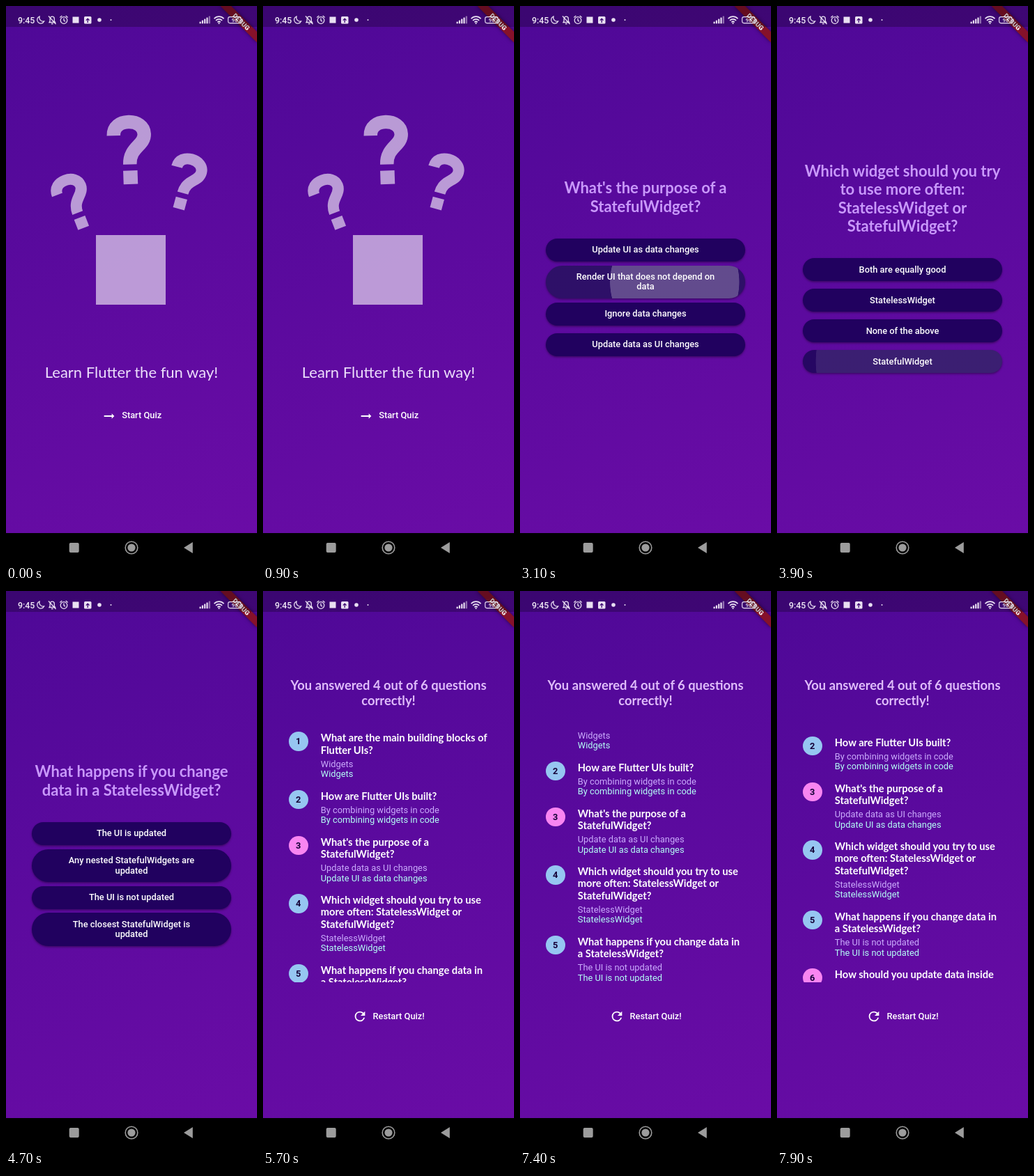
These frames come from a looping animation (360x800 px, 8000 ms). An HTML page:

```html
<!DOCTYPE html>
<html lang="en">
<head>
<meta charset="utf-8">
<title>Quiz</title>
<style>
html, body { margin: 0; width: 100%; height: 100%; overflow: hidden; background: #000; }
#stage { position: relative; width: 360px; height: 800px; overflow: hidden; background: #000;
  font: 500 12.83px/14.7px Roboto, sans-serif; color: #fff; }
#app { position: absolute; inset: 0 0 43.33px; background: linear-gradient(154.6deg, #4e0897, #6a0ca6); }
.screen { position: absolute; inset: 0 37px; display: flex; flex-direction: column; justify-content: center; }
.screen[hidden] { display: none; }
.title, .ask, .score, .q { font-family: Lato, sans-serif; white-space: pre; }
.title, .ask, .score { display: flex; justify-content: center; text-align: center; }
.title { position: absolute; top: 513px; left: 0; right: 0; font-size: 22px; line-height: 26.4px; font-weight: 400; color: #eddffc; }
.ask { font-weight: 700; font-size: 22px; line-height: 26.4px; color: #c999fb; margin-bottom: 27.5px; }
.slot { min-height: 44px; display: flex; align-items: center; }
.btn { width: 100%; box-sizing: border-box; padding: 9.16px 36.6px; border-radius: 24px; text-align: center;
  background-color: #21015f; box-shadow: 0 1.5px 3px rgba(0,0,0,.38); }
.link { height: 44px; display: flex; align-items: center; justify-content: center; gap: 7.3px; }
.link svg { width: 22px; height: 22px; fill: #fff; }
#start .link { position: absolute; top: 566.5px; left: 0; right: 0; }
.score { font-weight: 700; font-size: 18.33px; line-height: 22px; color: #e0bdfb; }
.list { height: 366.4px; margin: 27.5px 0; overflow: hidden; }
.item { display: flex; gap: 18.3px; padding: 7.33px 0; }
.badge { flex: none; width: 27.5px; height: 27.5px; border-radius: 50%; background: #96c6f1; color: #160238;
  font-weight: 700; line-height: 27.5px; text-align: center; }
.badge.bad { background: #f985f1; }
.q { font-weight: 700; font-size: 14.66px; line-height: 17.33px; margin-bottom: 4.58px; }
.a { font-weight: 400; white-space: pre; color: #caabfc; }
.a + .a { color: #b5fef6; }
#bar { position: absolute; inset: 0 0 auto; height: 30.33px; background: rgba(0,0,0,.25); }
#over { position: absolute; inset: 0; }
#banner { position: absolute; left: 301.4px; top: 16.6px; width: 73.3px; height: 11px; transform: rotate(45deg);
  background: #86112a; box-shadow: 0 0 5px rgba(0,0,0,.5); color: #fff; text-align: center;
  font: 900 9.35px/11px Roboto, sans-serif; }
</style>
</head>
<body>
<div id="stage">
  <div id="app">
    <div class="screen" id="start">
      <svg style="position:absolute;left:-37px;top:0" width="360" height="500" opacity=".59">
        <defs>
          <g id="mark">
            <path d="M-22-21C-22-34-12-40-0-40S22-33 22-22C22-5 0-4 0 21" fill="none" stroke="#fff" stroke-width="19.5"/>
            <rect x="-10" y="30" width="20.500" height="19.500" fill="#fff"/>
          </g>
        </defs>
        <g id="marks"></g>
        <rect x="129" y="329" width="100" height="100" fill="#fff"/>
      </svg>
      <div class="title">Learn Flutter the fun way!</div>
      <div class="link"><svg viewBox="0 0 24 24"><path d="M16 11H4v2h12v3l4-4-4-4z"/></svg>Start Quiz</div>
    </div>
  </div>
  <div id="banner">DEBUG</div>
  <div id="bar"></div>
  <svg id="over" width="360" height="800" fill="none" stroke="#e9e0f2" stroke-width="1.3">
    <text x="17" y="24.6" fill="#f0eaf6" stroke="none" font-size="12.4">9:45</text>
    <path d="M48 15a5.2 5.2 0 1 0 6.6 7A5.6 5.6 0 0 1 48 15z"/>
    <path d="M62 23.5h8.6l-1.3-2v-3.2a3.1 3.1 0 0 0-6.2 0v3.2zM65 25.6h2.6M61 14.5l10.5 11.5"/>
    <circle cx="83" cy="20.5" r="4.8"/><path d="M83 17.5v3.3l2 1.3M77.3 16.5l3-2.5M88.7 16.5l-3-2.5"/>
    <g fill="#e9e0f2" stroke="none">
      <rect x="95.5" y="15.5" width="9" height="9"/>
      <rect x="112" y="15" width="10.5" height="10.5" rx="1.5"/>
      <circle cx="134" cy="20" r="2.8"/><circle cx="150.5" cy="20" r="1"/>
    </g>
    <path d="M117.2 24v-5.5M114.8 20.6l2.4-2.4 2.4 2.4" stroke="#3d0873"/>
    <g id="signal" stroke="none" fill="#e9e0f2"></g>
    <path d="M298.5 18.3a9.5 9.5 0 0 1 14 0M301 20.9a6.2 6.2 0 0 1 9 0M303.4 23.3a3 3 0 0 1 4.2 0" stroke-width="1.7"/>
    <circle cx="305.5" cy="25" r="1.1" fill="#e9e0f2" stroke="none"/>
    <rect x="318.6" y="15.6" width="18.4" height="9" rx="2.5" stroke-width="1.1"/>
    <path d="M338.8 18.5v3.2"/>
    <text x="328" y="23" text-anchor="middle" font-size="8" fill="#e9e0f2" stroke="none">98</text>
    <g fill="#9c9c9c" stroke="none">
      <rect x="90.7" y="771" width="14" height="14" rx="2"/>
      <circle cx="180" cy="778" r="5.6"/>
      <path d="M255 778l12.8-8v16z"/>
    </g>
    <circle cx="180" cy="778" r="8.8" stroke="#9c9c9c" stroke-width="1.6"/>
  </svg>
</div>
<script>
const LOOP = 8000;
const $ = id => document.getElementById(id);

// from: time the question appears; tap: index of the chosen button
const quiz = [
  { from: 1300, tap: 2, ask: 'What are the main building\nblocks of Flutter UIs?',
    opts: ['Blocks', 'Functions', 'Widgets', 'Components'],
    q: 'What are the main building blocks of\nFlutter UIs?', right: 'Widgets' },
  { from: 2300, tap: 1, ask: 'How are Flutter UIs built?',
    opts: ['By defining widgets in config files', 'By combining widgets in code',
      'By combining widgets in a visual editor', 'By using one tool for phones and another tool for tablets'],
    q: 'How are Flutter UIs built?', right: 'By combining widgets in code' },
  { from: 3000, tap: 3, ask: "What's the purpose of a\nStatefulWidget?",
    opts: ['Update UI as data changes', 'Render UI that does not depend on data',
      'Ignore data changes', 'Update data as UI changes'],
    q: "What's the purpose of a\nStatefulWidget?", right: 'Update UI as data changes' },
  { from: 3650, tap: 1, ask: 'Which widget should you try\nto use more often:\nStatelessWidget or\nStatefulWidget?',
    opts: ['Both are equally good', 'StatelessWidget', 'None of the above', 'StatefulWidget'],
    q: 'Which widget should you try to use\nmore often: StatelessWidget or\nStatefulWidget?', right: 'StatelessWidget' },
  { from: 4250, tap: 2, ask: 'What happens if you change\ndata in a StatelessWidget?',
    opts: ['The UI is updated', 'Any nested StatefulWidgets are updated',
      'The UI is not updated', 'The closest StatefulWidget is updated'],
    q: 'What happens if you change data in\na StatelessWidget?', right: 'The UI is not updated' },
  { from: 4900, tap: 2, ask: 'How should you update data\ninside of StatefulWidgets?',
    opts: ['By calling updateUI()', 'By calling setState()', 'By calling updateState()', 'By calling updateData()'],
    q: 'How should you update data inside\nof StatefulWidgets?', right: 'By calling setState()' }
];
const RESULTS = 5500;
const SCROLL = { from: 6300, to: 7900, by: 77, power: 1.68 };

function addScreen(html) {
  const el = document.createElement('div');
  el.className = 'screen';
  el.innerHTML = html;
  $('app').append(el);
  return el;
}

const screens = [{ from: 0, el: $('start') }];
for (const { from, ask, opts } of quiz) {
  const rows = opts.map(o => `<div class="slot"><div class="btn">${o}</div></div>`).join('');
  const el = addScreen(`<div class="ask">${ask}</div>${rows}`);
  screens.push({ from, el, btns: [...el.querySelectorAll('.btn')] });
}

const items = quiz.map(({ q, right, opts, tap }, i) => {
  const bad = opts[tap] === right ? '' : ' bad';
  return `<div class="item"><div class="badge${bad}">${i + 1}</div><div><div class="q">${q}</div>` +
    `<div class="a">${opts[tap]}</div><div class="a">${right}</div></div></div>`;
}).join('');
const results = addScreen(`<div class="score">You answered 4 out of 6 questions\ncorrectly!</div>
  <div class="list"><div>${items}</div></div>
  <div class="link"><svg viewBox="0 0 24 24"><path d="M17.65 6.35A8 8 0 0 0 12 4a8 8 0 1 0 7.73 10h-2.08A6 6 0 1 1 12 6c1.66 0 3.14.69 4.22 1.78L13 11h7V4z"/></svg>Restart Quiz!</div>`);
screens.push({ from: RESULTS, el: results });
const list = results.querySelector('.list > div');

// question marks: centre, scale, tilt
$('marks').innerHTML = [[177, 206.5, 1, -2], [96.5, 281, .82, -21], [258, 252, .82, 15]]
  .map(([x, y, scale, tilt]) =>
    `<use href="#mark" transform="translate(${x} ${y}) rotate(${tilt}) scale(${scale})"/>`).join('');

$('signal').innerHTML = [0, 1, 2, 3, 4].map(i =>
  `<rect x="${277.5 + i * 3.3}" y="${22.5 - i * 2}" width="2.2" height="${2.8 + i * 2}" rx=".6" opacity="${i > 3 ? .5 : 1}"/>`).join('');

const clamp = v => Math.min(1, Math.max(0, v));

// Ink spreading around one press, as stacked background layers
function ink(dt) {
  const p = clamp((dt + 100) / 400);
  const fade = 1 - clamp((dt - 100) / 250);
  if (dt < -100 || !fade) return 'none';
  const r = 36 + 112 * p, x = 227 - 84 * p;
  const glow = `rgba(255,255,255,${.25 * fade})`, veil = `rgba(255,255,255,${.06 * fade})`;
  return `radial-gradient(circle at ${x}px 50%, ${glow} ${r}px, transparent ${r + .7}px),` +
    `linear-gradient(${veil}, ${veil})`;
}

function draw(t) {
  const now = screens.findLastIndex(s => t >= s.from);
  screens.forEach((s, i) => { s.el.hidden = i !== now; });
  const { btns, from } = screens[now];
  if (btns) {
    const layers = btns.map(() => 'none');
    const press = (tap, dt) => { const l = ink(dt); if (l !== 'none') layers[tap] = l; };
    // a press outlives its question and keeps glowing on the same row
    if (now > 1) press(quiz[now - 2].tap, t - from);
    press(quiz[now - 1].tap, t - screens[now + 1].from);
    btns.forEach((b, i) => { b.style.backgroundImage = layers[i]; });
  }
  const u = clamp((t - SCROLL.from) / (SCROLL.to - SCROLL.from));
  list.style.transform = `translateY(${-SCROLL.by * u ** SCROLL.power}px)`;
}

function tick() {
  draw(performance.now() % LOOP);
  requestAnimationFrame(tick);
}
tick();
</script>
</body>
</html>
```
